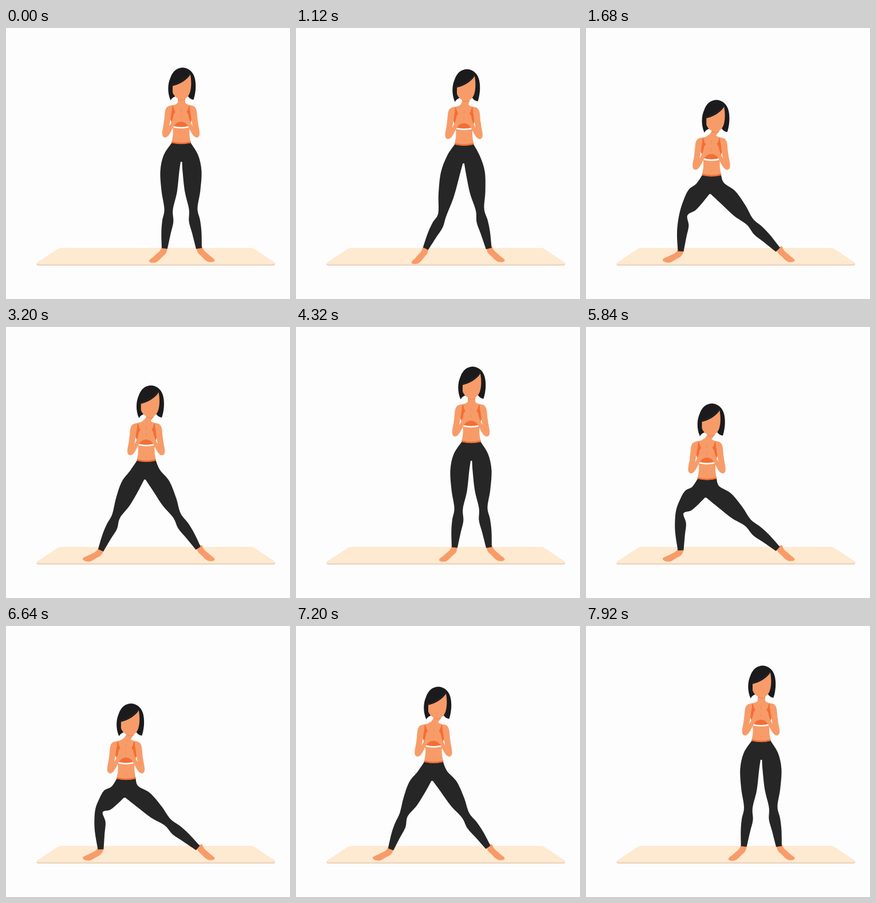
Write an HTML page with a canvas that moves like this. It is 496 by 472 pixels and loops after 8 s.

```html
<!DOCTYPE html>
<html lang="en">
<head>
<meta charset="utf-8">
<title>Side lunge</title>
<style>
  html, body { margin: 0; width: 100%; height: 100%; overflow: hidden; background: #fdfdfd; }
  canvas { display: block; }
</style>
</head>
<body>
<canvas id="stage" width="496" height="472"></canvas>
<script>
const ctx = document.getElementById('stage').getContext('2d');
const LOOP = 8000, REP = 4040;
const SKIN = '#f79c69', SHADE = '#ef8750', ORANGE = '#f26f36', DARK = '#262626', HAIR = '#1b1b1d';

const ease = (t, start, length) => {
  const u = Math.min(1, Math.max(0, (t - start) / length));
  return (1 - Math.cos(Math.PI * u)) / 2;
};
const mix = (a, b, t) => [a[0] + (b[0] - a[0]) * t, a[1] + (b[1] - a[1]) * t];

function fill(path, color) {
  ctx.fillStyle = color;
  ctx.fill(new Path2D(path));
}
function stroke(path, color, width) {
  ctx.strokeStyle = color;
  ctx.lineWidth = width;
  ctx.lineCap = 'round';
  ctx.stroke(new Path2D(path));
}
function placed(x, y, angle, draw) {
  ctx.save();
  ctx.translate(x, y);
  ctx.rotate(angle);
  draw();
  ctx.restore();
}
function mirrored(axis, draw) {
  ctx.save();
  ctx.transform(-1, 0, 0, 1, 2 * axis, 0);
  draw();
  ctx.restore();
}

// Smooth curve through the points, joined to the current path
function curve(points) {
  ctx.lineTo(...points[0]);
  for (let i = 0; i < points.length - 1; i++) {
    const a = points[i], b = points[i + 1];
    const before = points[i - 1] || a, after = points[i + 2] || b;
    ctx.bezierCurveTo(
      a[0] + (b[0] - before[0]) / 6, a[1] + (b[1] - before[1]) / 6,
      b[0] - (after[0] - a[0]) / 6, b[1] - (after[1] - a[1]) / 6, ...b);
  }
}

// Outer and inner outline of a leg; side is -1 for the left one
function legEdges(hip, knee, ankle, side) {
  const normal = (a, b) => {
    const dx = b[0] - a[0], dy = b[1] - a[1], len = Math.hypot(dx, dy);
    return [side * dy / len, -side * dx / len];
  };
  const thigh = normal(hip, knee), calf = normal(knee, ankle);
  const at = (a, b, t, n, w) => {
    const p = mix(a, b, t);
    return [p[0] + n[0] * w, p[1] + n[1] * w];
  };
  const bend = mix(thigh, calf, 0.5);
  const edge = (upper, mid, low, joint, c1, c2, end) => [
    at(hip, knee, 0, thigh, upper), at(hip, knee, 0.3, thigh, mid),
    at(hip, knee, 0.67, thigh, low), at(knee, ankle, 0, bend, joint),
    at(knee, ankle, 0.3, calf, c1), at(knee, ankle, 0.6, calf, c2), at(knee, ankle, 1, calf, end)
  ];
  return {
    outer: edge(13.5, 18, 14, 7.5, 9, 8.5, 5),
    inner: edge(0, -15, -13, -7.5, -10.5, -8, -5).slice(1)
  };
}

function drawMat() {
  fill('M57 408 H467 Q471 409 470 412 Q469 414 465 414 H58 Q53 414 53 411Z', '#ecd6c0');
  fill('M96 383 H428 Q431 383 434 385 L469 408 Q471 411 466 411.5 H57 Q51 411 55 408 L90 385 Q93 383 96 383Z', '#fee9d1');
}

function drawFoot() {
  fill('M-5 -3 L5 -1 C4 5 3 9 -1 12 C-6 16 -10 22 -15 24 C-20 25.5 -25 25 -27 22.5 C-27.5 19 -22 17 -18 13 C-13 8 -7 6 -5 -3Z', SKIN);
}

function drawLegs(shift, drop, step) {
  const hipL = [289 - shift + step, 222 + drop + step], hipR = [322 - shift - 4 * step, 222 + drop + step];
  const kneeL = [284 - 40 * step - 0.85 * shift, 316 + 26 * step - 0.21 * shift];
  const kneeR = [327 - 0.47 * shift, 315 + 0.4 * drop];
  const swing = Math.sin(Math.PI * step);
  const ankleL = [277 - 111.5 * step, 384 + 5 * step - 2 * swing];
  const ankleR = [337 - 0.02 * shift, 384 + 0.04 * drop];

  placed(...ankleL, 0.245 * step - 0.22 * swing, drawFoot);
  mirrored(307.5, () => placed(277.5, 383, 0, drawFoot));

  const left = legEdges(hipL, kneeL, ankleL, -1), right = legEdges(hipR, kneeR, ankleR, 1);
  const crotch = 306 - shift - 3 * step, low = 233 + drop, waist = 200 + drop;
  ctx.beginPath();
  curve([[289.5 - shift, waist], ...left.outer]);
  curve([...left.inner.reverse(), [crotch - 1, low]]);
  curve([[crotch + 1.5, low], ...right.inner]);
  curve([...right.outer.reverse(), [322.5 - shift, waist]]);
  ctx.quadraticCurveTo(306 - shift, waist + 4, 289.5 - shift, waist);
  ctx.fillStyle = DARK;
  ctx.fill();
}

function drawArm() {
  fill('M284 136 C276 139 278 150 276 162 C275 172 272 180 273 186 C274 192 280 192 284 187 C289 181 291 172 297 166 Q301 163 306 163 V138 C302 138 297 145 293 150 C292 157 289 165 285 171 C287 163 288 152 290 140Z', SKIN);
}

function drawTorso() {
  fill('M300 130 H313 C315 134 322 134 328 136 C332 140 328 150 325 158 C319 174 319 184 323 200 Q306 206 289 200 C293 184 293 174 287 158 C282 150 279 140 284 136 C290 134 298 134 300 130Z', SKIN);
  fill('M290 136 H292 C293 143 296 147 299 150 H312 C315 147 318 143 319 136 H321 C321 148 325 152 325 156 L320 172 Q306 174 292 172 L286 156 C286 152 290 148 290 136Z', ORANGE);
  stroke('M292 172 Q306 175.5 319.5 172', '#fff', 2.6);
  drawArm();
  mirrored(305.5, drawArm);
  stroke('M305.7 140 V146 M305.7 152 V158', SHADE, 0.8);
  stroke('M306 192.5 V194', SHADE, 1.2);
}

function drawHair() {
  fill('M287.5 126 C281.5 112 282.5 97 287 87 C291 75 299 69 309 69 C322 70 330 80 331 95 C332 107 330 117 327.5 125 Q321 124 318 119 H296 Q290 121 287.5 126Z', HAIR);
}

function drawFace() {
  stroke('M301 123.5 Q307 127 313 123.5', SHADE, 1.2);
  fill('M291 101 C303 98 315 92 322 81 C324 93 324 104 321 113 C318 121 312 124.5 307 124.5 C300 124 293 119 291 112Z', SKIN);
  stroke('M290 99 C303 95.5 314 89 322 79', '#303033', 0.8);
}

function drawScene(time) {
  const t = time % REP;
  const step = ease(t, 720, 851) - ease(t, 3230, 700);
  const shift = 96 * (ease(t, 890, 992) - ease(t, 2704, 1200));
  const drop = Math.pow(Math.max(0, shift) / 6.22, 1.531);
  const headLag = 6 * (1 - Math.exp(-shift / 25));

  ctx.fillStyle = '#fdfdfd';
  ctx.fillRect(0, 0, 496, 472);
  drawMat();
  placed(headLag - shift, drop, 0, drawHair);
  placed(-shift, drop, 0, () => {
    fill(`M${300 + headLag} 112 H${313 + headLag} V124 L313 132 H300 L${300 + headLag} 124Z`, SKIN);
    drawTorso();
  });
  drawLegs(shift, drop, step);
  placed(-shift, drop, 0, () => stroke('M290.5 199 Q306 203 321.5 199', ORANGE, 2.6));
  placed(headLag - shift, drop, 0, drawFace);
}

const began = performance.now();
function tick() {
  drawScene((performance.now() - began) % LOOP);
  requestAnimationFrame(tick);
}
tick();
</script>
</body>
</html>
```
